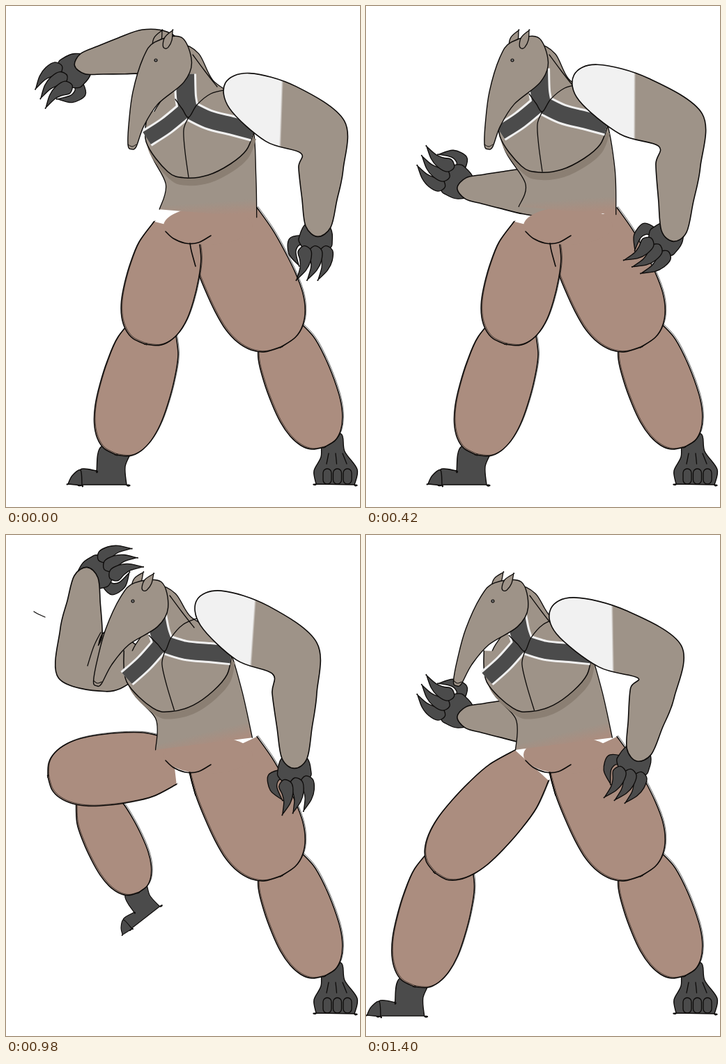
An HTML page for the animation above (1540 ms loop, 508 by 720 pixels).

```html
<!DOCTYPE html>
<html lang="en">
<head>
<meta charset="utf-8">
<title>Dancing anteater</title>
<style>
html, body { margin: 0; width: 100%; height: 100%; overflow: hidden; background: #fff; }
svg { display: block; width: 100vw; height: 100vh; stroke-linecap: round; stroke-linejoin: round; }
.pose { visibility: hidden; animation: show 1540ms step-end infinite; }
@keyframes show {
  0% { visibility: visible; }
  9.0909%, 100% { visibility: hidden; }
}
</style>
</head>
<body>
<svg id="stage" viewBox="0 0 508 720"></svg>
<script>
const GREY = '#9e9388', BROWN = '#ab8d7f', DARK = '#4b4b4b', WHITE = '#f1f1f1', SHADE = '#8b7f73', INK = '#0d0b0a';
const STEP = 140;

const mix = (a, b, t) => [0, 1].map(k => a[k] + (b[k] - a[k]) * t);
const add = (a, b) => [a[0] + b[0], a[1] + b[1]];
const spin = ([x, y], deg) => {
  const c = Math.cos(deg * Math.PI / 180), s = Math.sin(deg * Math.PI / 180);
  return [x * c - y * s, x * s + y * c];
};
const group = (t, s) => `<g transform="${t}">${s}</g>`;
const path = (d, fill, w = 1.5, ink = INK) => `<path d="${d}" fill="${fill}" stroke="${ink}" stroke-width="${w}"/>`;

// Catmull-Rom path; a doubled point makes a corner.
function curve(p, closed) {
  const n = p.length;
  const at = i => closed ? p[(i + n) % n] : p[Math.max(0, Math.min(n - 1, i))];
  let d = 'M' + p[0];
  for (let i = 0; i < n - (closed ? 0 : 1); i++) {
    const [a, b, c, e] = [at(i - 1), at(i), at(i + 1), at(i + 2)];
    const ctrl = [0, 1].map(k => b[k] + (c[k] - a[k]) / 6).concat([0, 1].map(k => c[k] - (e[k] - b[k]) / 6), c);
    d += 'C' + ctrl.map(v => v.toFixed(1));
  }
  return d + (closed ? 'Z' : '');
}
const points = s => s.split(' ').map(q => q.split(',').map(Number));
const line = (s, w = 1.3, ink = INK) => path(curve(points(s)), 'none', w, ink);
const blob = (s, fill) => path(curve(points(s), true), fill, 1.4);

// Outline around a spine of [x, y, radius] keys; an open tube has no start cap.
function tube(keys, open) {
  const last = keys.length - 1, left = [], right = [], caps = [];
  keys.forEach(([x, y, r], i) => {
    const a = keys[Math.max(0, i - 1)], b = keys[Math.min(last, i + 1)];
    const len = Math.hypot(b[0] - a[0], b[1] - a[1]);
    const u = (b[0] - a[0]) / len, v = (b[1] - a[1]) / len;
    left.push([x - v * r, y + u * r]);
    right.unshift([x + v * r, y - u * r]);
    if (i === 0) caps[0] = [x - u * r * .8, y - v * r * .8];
    if (i === last) caps[1] = [x + u * r * .8, y + v * r * .8];
  });
  const rim = [...left, caps[1], ...right];
  return curve(open ? rim : [caps[0], ...rim], !open);
}

// Leg muscle: superellipse along a bone, cut off at the top; a thin second stroke looks sketched.
function muscle(a, b, wide, cut) {
  const keys = [];
  for (let i = 0; i <= 8; i++) {
    const t = Math.sin(i / 8 * Math.PI / 2), u = Math.abs(t - .53) / (t > .53 ? .47 : .53 + cut);
    keys.push([...mix(a, b, t), wide * Math.max(0, 1 - u ** 2.4) ** (1 / 2.4)]);
  }
  const d = tube(keys, true);
  return path(d, BROWN, 1.6) + group('translate(1.5 -1.3)', path(d, 'none', .6));
}
const thigh = (hip, knee, wide = 51, cut = .1) => muscle(hip, knee, wide, cut);
const shin = (knee, ankle) => muscle(knee, ankle, Math.hypot(knee[0] - ankle[0], knee[1] - ankle[1]) * .25, .06);

const sideFoot =
  blob('-21,-12 -28,23 -28,23 -51,21 -50,43 -50,43 15,43 15,43 13,17 21,-12', DARK) +
  blob('-51,22 -63,30 -69,42 -69,42 -49,44 -49,44', DARK);
const leftLeg = ({ hip, tip, knee, ankle, foot: [turn, size] }) =>
  group(`translate(${ankle}) rotate(${turn}) scale(${size})`, sideFoot) + shin(knee, ankle) + thigh(hip, tip);

const frontFoot = blob('455,622 452,648 442,668 445,687 445,687 500,688 500,688 504,666 486,640 481,615', DARK) +
  [0, 1, 2].map(i => {
    const x = 461 + i * 14.5;
    return `<rect x="${x - 6}" y="665" width="12" height="22" rx="6" fill="${DARK}" stroke="${INK}" stroke-width="1.3"/>` +
      line(`${463 + i * 10},643 ${x - 1},658`);
  }).join('');
const rightLeg = frontFoot + shin([388, 455], [457, 634]) + thigh([311, 313], [395, 490], 64, .32);

// Hand hanging from its wrist, thumb to the left
const claw = (x, y) => group(`translate(${x} ${y})`, path(tube([[0, 0, 9], [1, 13, 7.5], [-2, 25, 4.5], [-11, 40, 0]]), DARK, 1.3));
const handShape =
  path(tube([[-22, 18, 6], [-34, 22, 8], [-36, 37, 5], [-27, 54, 0]]), DARK, 1.3) +
  path(tube([[0, 0, 18], [-3, 16, 23], [-5, 27, 21]]), DARK, 1.3) +
  [2, 1, 0].map(i => claw(-19 + 15 * i, 34)).join('');
const hand = (wrist, turn, flip = 1) => group(`translate(${wrist}) rotate(${turn}) scale(${1.03 * flip} 1.03)`, handShape);

let ids = 0;
function arm({ s, e, w, turn, flip, size = 1 }, band) {
  const mid = mix(s, e, .5), id = 'g' + ids++;
  const keys = [[...s, 29], [...mid, 45], [...e, 39], [...mix(e, w, .35), 32], [...mix(e, w, .7), 25], [...w, 18]];
  const d = tube(keys.map(([x, y, r]) => [x, y, r * size]));
  // White shoulder ends in a straight edge across the upper arm.
  const tilt = Math.atan2(e[1] - s[1], e[0] - s[0]) * 180 / Math.PI - 27;
  const fade = `<linearGradient id="${id}" gradientUnits="userSpaceOnUse" x1="-50" x2="50" y1="0" y2="0"
    gradientTransform="translate(${mid}) rotate(${tilt})"><stop offset=".49" stop-color="${WHITE}"/><stop offset=".52" stop-color="${GREY}"/></linearGradient>`;
  return hand(w, turn, flip) + (band ? fade : '') + path(d, band ? `url(#${id})` : GREY, 1.6);
}

// Chest around its breastbone
const bowl = curve(points('-58,-10 -61,35 -30,78 -4,87 28,83 60,67 83,47 94,20'));
const straps = [['-5,-62 -4,-30 0,-8', 26], ['-3,-12 -32,12 -60,30', 21], ['-6,-14 28,3 63,12 93,20', 24]];
const chest =
  group('translate(3 11)', path(bowl, SHADE, 0, 'none')) + path(bowl, GREY) +
  `<g stroke-linecap="butt">${[[6, WHITE], [0, DARK]].map(([extra, ink]) =>
    straps.map(([p, w]) => line(p, w + extra, ink)).join('')).join('')}</g>` +
  line('-19,-26 -9,-12 0,0 12,-18 32,-34 56,-40') + line('0,0 -7,18 -5,50 0,86');

// Neck follows the head; the colour change follows the lean.
function torso({ eye, bone, lean, waist, hip }) {
  const neck = add(eye, [40, -5]), heart = add(bone, spin([18, 30], lean)), id = 'g' + ids++;
  const keys = [[...hip, 70], [...waist, 65], [...heart, 76], [...mix(neck, heart, .62), 62], [...mix(neck, heart, .35), 34], [...neck, 22]];
  return `<ellipse cx="290" cy="316" rx="64" ry="27" fill="${BROWN}"/>
    <linearGradient id="${id}" gradientUnits="userSpaceOnUse" x1="0" x2="0" y1="-10" y2="10"
      gradientTransform="translate(${hip[0]} ${hip[1] - 6}) rotate(${lean * 1.1 - 4})"><stop stop-color="${GREY}"/><stop offset="1" stop-color="${BROWN}"/></linearGradient>` +
    path(tube(keys, true), `url(#${id})`, 1.3) +
    group(`translate(${eye})`, line('53,-8 70,15 88,38')) +
    group(`translate(${bone}) rotate(${lean})`, chest) +
    line('229,324 240,334 258,341 276,340 294,330', 1.6) + line('264,341 266,352 272,374', 1.6);
}

// Head around its eye
const ear = (x, y) => path(tube([[x, y, 4], [x + 4, y - 11, 5.5], [x + 10, y - 23, 0]]), GREY, 1.3);
const headShape = ear(-1, -20) +
  path(tube([[25, -12, 30], [11, 14, 34], [-15, 54, 20], [-28, 92, 11], [-34, 123, 6]]), GREY, 1.4) +
  ear(14, -20) + line('-40,121 -34,124 -28,121', 1) +
  `<circle r="2" fill="#777" stroke="${INK}" stroke-width="1.2"/>`;
const head = ({ eye, nod = 0 }) => group(`translate(${eye}) rotate(${nod})`, headShape);

// Joint positions
const legs = {
  stand: { hip: [244, 318], tip: [200, 486], knee: [215, 450], ankle: [158, 645], foot: [0, 1] },
  raised: { hip: [241, 326], tip: [60, 347], knee: [120, 370], ankle: [190, 514], foot: [-38, .8] },
  high: { hip: [241, 326], tip: [59, 332], knee: [116, 356], ankle: [168, 505], foot: [-34, .8] },
  step: { hip: [240, 321], tip: [79, 408], knee: [103, 398], ankle: [47, 593], foot: [-28, .95] },
  wide: { hip: [238, 331], tip: [98, 485], knee: [123, 454], ankle: [69, 649], foot: [0, .98] }
};
const lefts = {
  up: { s: [250, 80], e: [195, 66], w: [110, 83], turn: 62, flip: -1, size: .82 },
  out: { s: [215, 130], e: [150, 185], w: [112, 243], turn: 45, flip: -1, size: .85 },
  down: { s: [145, 190], e: [146, 310], w: [195, 411], turn: -58, flip: -1 },
  bent: { s: [290, 262], e: [225, 266], w: [143, 262], turn: 115, size: .84 },
  salute: { s: [182, 182], e: [104, 182], w: [115, 60], turn: -122, size: .95 }
};
const rights = {
  hang: { s: [335, 122], e: [454, 188], w: [448, 317], turn: 0 },
  front: { s: [267, 122], e: [388, 188], w: [378, 320], turn: 5 },
  hip: { s: [319, 110], e: [451, 178], w: [442, 324], turn: 38 },
  sweep: { s: [319, 110], e: [410, 210], w: [336, 264], turn: 85 },
  across: { s: [400, 135], e: [300, 205], w: [158, 163], turn: 140 },
  side: { s: [294, 105], e: [414, 177], w: [414, 321], turn: -10 },
  back: { s: [286, 116], e: [421, 182], w: [392, 311], turn: 15 }
};
const bodies = {
  tall: { eye: [215, 78], bone: [262, 160], lean: 0, waist: [294, 250], hip: [290, 298] },
  bow: { eye: [147, 126], bone: [201, 170], lean: -19, waist: [268, 262], hip: [284, 310] },
  guard: { eye: [210, 78], bone: [253, 152], lean: 0, waist: [293, 245], hip: [289, 294] },
  turn: { eye: [275, 68], nod: 8, bone: [300, 130], lean: 0, waist: [312, 255], hip: [300, 298] },
  sway: { eye: [182, 95], nod: 8, bone: [228, 167], lean: -9, waist: [277, 245], hip: [284, 300] }
};
const poses = [
  ['stand', 'up', 'tall', 'hang'],
  ['stand', 'out', 'tall', 'hang'],
  ['stand', 'down', 'bow', 'front'],
  ['stand', 'bent', 'guard', 'hip'],
  ['stand', 'bent', 'guard', 'sweep'],
  ['stand', 'bent', 'turn', 'across'],
  ['stand', 'bent', 'sway', 'side'],
  ['raised', 'salute', 'sway', 'side'],
  ['high', 'bent', 'sway', 'side'],
  ['step', 'bent', 'sway', 'side'],
  ['wide', 'bent', 'sway', 'back']
];
// Small marks that show in single poses
const extras = {
  up: `<ellipse cx="204" cy="163" rx="8" ry="17" fill="${WHITE}"/>`,
  down: `<ellipse cx="147" cy="205" rx="13" ry="22" fill="${WHITE}"/>`,
  turn: path(tube([[206, 153, 11], [250, 152, 17]]), WHITE),
  salute: line('40,110 47,114 56,118') + line('136,140 126,160 117,188')
};
document.getElementById('stage').innerHTML = poses.map(([leg, left, body, right], i) =>
  `<g class="pose" style="animation-delay:${(i - poses.length) * STEP}ms">` +
  rightLeg + leftLeg(legs[leg]) + arm(lefts[left]) + (extras[left] || '') + (extras[body] || '') +
  torso(bodies[body]) + arm(rights[right], true) + head(bodies[body]) + '</g>').join('');
</script>
</body>
</html>
```
